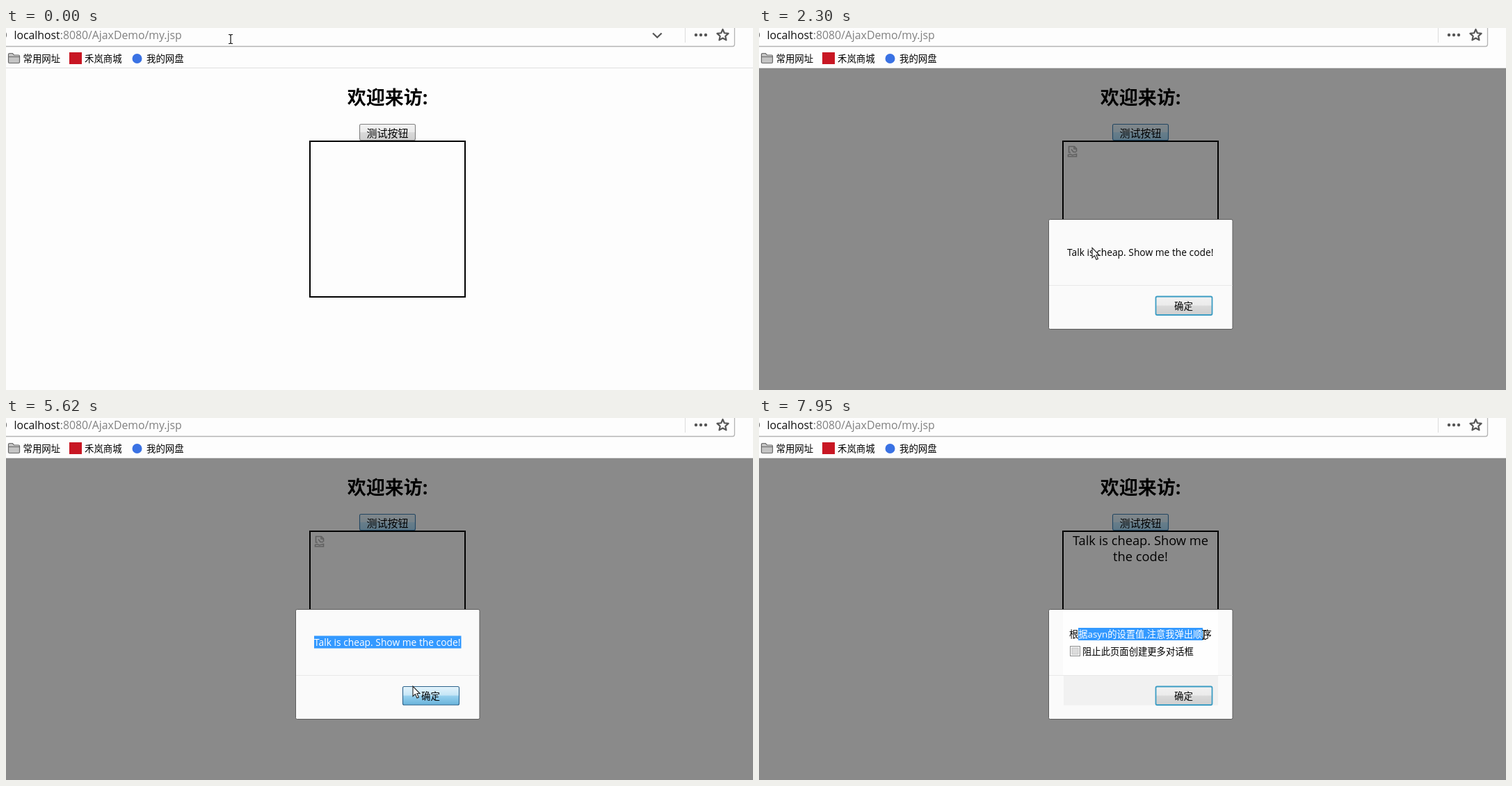
An HTML page for the animation above (8000 ms loop, 1074x521 px).

```html
<!DOCTYPE html>
<html lang="zh">
<head>
<meta charset="utf-8">
<style>
html, body { margin: 0; width: 100%; height: 100%; overflow: hidden; background: #fdfdfd; }
svg { display: block; width: 100%; height: 100%; }
text { font-family: "Open Sans", "Noto Sans CJK SC", "Noto Sans CJK", sans-serif; white-space: pre; }
.mid { text-anchor: middle; }
.small { font-size: 13.4px; }
.icon { fill: none; stroke: #555; stroke-width: 2.2; }
</style>
</head>
<body>
<svg viewBox="0 0 1074 521">
  <defs>
    <linearGradient id="normal" x2="0" y2="1">
      <stop stop-color="#f2f2f2"/><stop offset=".48" stop-color="#ebebeb"/>
      <stop offset=".5" stop-color="#dadada"/><stop offset="1" stop-color="#cfcfcf"/>
    </linearGradient>
    <linearGradient id="hover" x2="0" y2="1">
      <stop stop-color="#eaf6fd"/><stop offset=".48" stop-color="#d9f0fc"/>
      <stop offset=".5" stop-color="#bee6fd"/><stop offset="1" stop-color="#a7d9f5"/>
    </linearGradient>
    <linearGradient id="pressed" x2="0" y2="1">
      <stop stop-color="#e5f4fc"/><stop offset=".48" stop-color="#c4e5f6"/>
      <stop offset=".5" stop-color="#98d1ef"/><stop offset="1" stop-color="#68b3db"/>
    </linearGradient>
    <clipPath id="selectionClip"><rect id="clipRect" height="18"/></clipPath>
  </defs>

  <rect width="1074" height="521" fill="#fdfdfd"/>

  <!-- address bar -->
  <path d="M0 26.5H1044.5Q1047.5 26.5 1047.5 23.5V0" fill="none" stroke="#b4b4b4" stroke-width="1.3"/>
  <circle cx="-5" cy="10" r="5.5" fill="none" stroke="#777" stroke-width="1.4"/>
  <text x="11.5" y="16" font-size="15.8" fill="#808080"><tspan fill="#111">localhost</tspan>:8080/AjaxDemo/my.jsp</text>
  <path id="chevron" class="icon" d="M930 7.5l6.3 6 6.3-6"/>
  <path d="M976.5 0V21" stroke="#ddd"/>
  <g fill="#555"><circle cx="992" cy="10" r="2.2"/><circle cx="999" cy="10" r="2.2"/><circle cx="1006" cy="10" r="2.2"/></g>
  <path id="star" class="icon" stroke-linejoin="round"/>

  <!-- bookmarks -->
  <path d="M3.5 49V38q0-1.5 1.5-1.5h4.5l2 2.5H18q1.5 0 1.5 1.5V49q0 1.5-1.5 1.5H5q-1.5 0-1.5-1.5ZM4 41.5H19" fill="#c4c4c4" stroke="#666" stroke-width="1.2"/>
  <text class="small" x="24.5" y="49">常用网址</text>
  <rect x="91" y="35" width="18" height="17" fill="#c81623"/>
  <text class="small" x="113" y="49">禾岚商城</text>
  <circle cx="188.5" cy="44" r="7" fill="#3a72e4"/>
  <text class="small" x="202" y="49">我的网盘</text>
  <path d="M0 57.5H1074" stroke="#e0e0e0"/>

  <!-- page -->
  <text class="mid" x="548.5" y="109.5" font-size="27" font-weight="bold">欢迎来访:</text>
  <rect id="testButton" x="508.5" y="138.5" width="80" height="23" rx="2"/>
  <text id="testLabel" class="mid" y="156.5" font-size="15">测试按钮</text>
  <rect x="437" y="163" width="223" height="224" fill="none" stroke="#000" stroke-width="2"/>
  <path id="brokenImage" fill="none" stroke="#b0b0b0" stroke-width="1.6"
    d="M448 179H445.5V170.5H453.5L456.5 173.5V178M453 170.5V174H456.5M449 174.5l3 4h4M444.5 185V182.5l3-1 3 1.5 6-1.5V185Z"/>
  <g id="result" class="mid" font-size="18.3">
    <text x="548.5" y="183">Talk is cheap. Show me</text>
    <text x="548.5" y="206">the code!</text>
  </g>

  <!-- modal -->
  <g id="modal">
    <rect y="58" width="1074" height="463" fill-opacity=".455"/>
    <rect x="416.5" y="275.5" width="264.5" height="158" rx="2" fill="#fafafa" stroke="#5c5c5c"/>
    <g id="second">
      <path d="M437 278H660V370H437Z" fill="#fefefe"/>
      <path d="M438 371H660V413.5H438Z" fill="#f1f1f1"/>
      <rect x="447.5" y="328.5" width="14" height="14" fill="#f4f4f4" stroke="#8e8f8f"/>
      <rect x="450" y="331" width="9" height="9" fill="#dcdcdc" stroke="#c4c4c4"/>
      <text x="465" y="341" font-size="13.33">阻止此页面创建更多对话框</text>
    </g>
    <path d="M417 370.5H680.5" stroke="#e8e8e8"/>
    <g id="message1"><text x="443" y="328" font-size="13.8">Talk is cheap. Show me the code!</text></g>
    <g id="message2"><text x="446" y="316" font-size="13.3">根据asyn的设置值,注意我弹出顺序</text></g>
    <g id="selection">
      <rect id="selectionRect" height="18" fill="#39f"/>
      <g clip-path="url(#selectionClip)" fill="#fff"><use id="selectedText"/></g>
    </g>
    <rect id="okButton" x="570.5" y="386.5" width="81" height="26.5" rx="2"/>
    <text class="mid" x="610.5" y="405" font-size="13.4">确定</text>
  </g>

  <path id="arrow" d="M0 0V14.5L3.4 11.4L6 17L8.4 16L5.9 10.5H10Z" fill="#fff" stroke="#222" stroke-width="1.1"/>
  <path id="beam" d="M-3-6.5H-1L0-5.5 1-6.5H3M0-5.5V5.5M-3 6.5H-1L0 5.5 1 6.5H3" fill="none" stroke="#111" stroke-width="1.2"/>
</svg>
<script>
const $ = id => document.getElementById(id);
const set = (id, attrs) => { for (const k in attrs) $(id).setAttribute(k, attrs[k]); };
const show = (id, on) => { $(id).style.display = on ? '' : 'none'; };

const LOOP = 8000, PRESS = 1060, ALERT = 1210, SELECT = 3420, OK_PRESS = 5620, SECOND = 5930, MOVE_AGAIN = 6390;

// Pointer moves: first step, last step, step count, path (two points or a quadratic curve)
const moves = [
  { name: 'rest', from: 0, to: 0, steps: 1, path: [[323, 16], [323, 16]] },
  { name: 'toButton', from: 150, to: PRESS, steps: 8, path: [[335, 25], [526, 153]] },
  { name: 'toMessage', from: 1610, to: 2600, steps: 8, path: [[526, 160], [556, 310], [442, 327]] },
  { name: 'settle', from: 2750, to: 3290, steps: 5, path: [[444, 325], [441, 327]] },
  { name: 'select1', from: SELECT, to: 3680, steps: 3, path: [[462, 323], [521, 323]] },
  { name: 'select1', from: 3830, to: 4370, steps: 5, path: [[550, 323], [682, 318]] },
  { name: 'toOk', from: 4650, to: 5320, steps: 6, path: [[627, 339], [585, 386]] },
  { name: 'toSecond', from: MOVE_AGAIN, to: 7350, steps: 8, path: [[585, 386], [450, 350], [459, 311]] },
  { name: 'select2', from: 7500, to: 7950, steps: 4, path: [[505, 312], [640, 312]] }
];

function pointer(t) {
  const move = moves.filter(m => t >= m.from).pop();
  const last = move.steps - 1;
  const progress = last ? Math.min(1, (t - move.from) / (move.to - move.from)) : 1;
  const u = last ? Math.floor(progress * last + 1e-6) / last : 1;
  const e = 1 - (1 - u) ** 2;
  const [a, b, c] = move.path;
  const at = i => c
    ? a[i] * (1 - e) ** 2 + 2 * b[i] * e * (1 - e) + c[i] * e * e
    : a[i] + (b[i] - a[i]) * e;
  return { name: move.name, done: u === 1, x: at(0), y: at(1) };
}

function paintButton(id, state, focused) {
  const stroke = { normal: focused ? '#3c9dc4' : '#808080', hover: '#3c7fb1', pressed: '#2c628b' }[state];
  set(id, { fill: `url(#${state})`, stroke, 'stroke-width': focused && state === 'normal' ? 1.8 : 1.1 });
}

function paintSelection(t, p) {
  const second = t >= SECOND;
  const active = second ? p.name === 'select2' : t >= SELECT;
  show('selection', active);
  if (!active) return;
  const x = second ? 459 : 443, y = second ? 302 : 313.5;
  const end = second ? p.x - 2 : p.name === 'select1' ? Math.min(p.x, 654.5) : 654.5;
  for (const id of ['selectionRect', 'clipRect']) set(id, { x, y, width: end - x });
  set('selectedText', { href: second ? '#message2' : '#message1' });
}

function draw(t) {
  const p = pointer(t), modal = t >= ALERT, second = t >= SECOND;
  const onTest = p.x > 509 && p.x < 588 && p.y > 139 && p.y < 161;
  const pressed = t >= PRESS && !modal;
  paintButton('testButton', pressed ? 'pressed' : modal || onTest ? 'hover' : 'normal');
  set('testLabel', { x: pressed ? 549.5 : 548.5 });

  show('chevron', p.y < 26);
  show('modal', modal);
  show('brokenImage', modal && !second);
  show('result', second);
  show('second', second);
  show('message1', !second);
  show('message2', second);

  const onOk = p.y > 385 && !(second && t < MOVE_AGAIN);
  paintButton('okButton', t >= OK_PRESS && !second ? 'pressed' : onOk ? 'hover' : 'normal', true);
  paintSelection(t, p);

  const overText = p.y < 26 || (p.name.startsWith('select') && p.x < 655) || (p.name === 'toSecond' && p.done);
  show('beam', overText);
  show('arrow', !overText);
  set(overText ? 'beam' : 'arrow', { transform: `translate(${p.x} ${p.y})` });
}

const starPoints = Array.from({ length: 10 }, (_, i) => {
  const r = i % 2 ? 4 : 8.5, a = i * Math.PI / 5;
  return `${1030.5 + r * Math.sin(a)} ${10.5 - r * Math.cos(a)}`;
});
set('star', { d: `M${starPoints.join('L')}Z` });

const start = performance.now();
function frame() {
  draw((performance.now() - start) % LOOP);
  requestAnimationFrame(frame);
}
frame();
</script>
</body>
</html>
```
